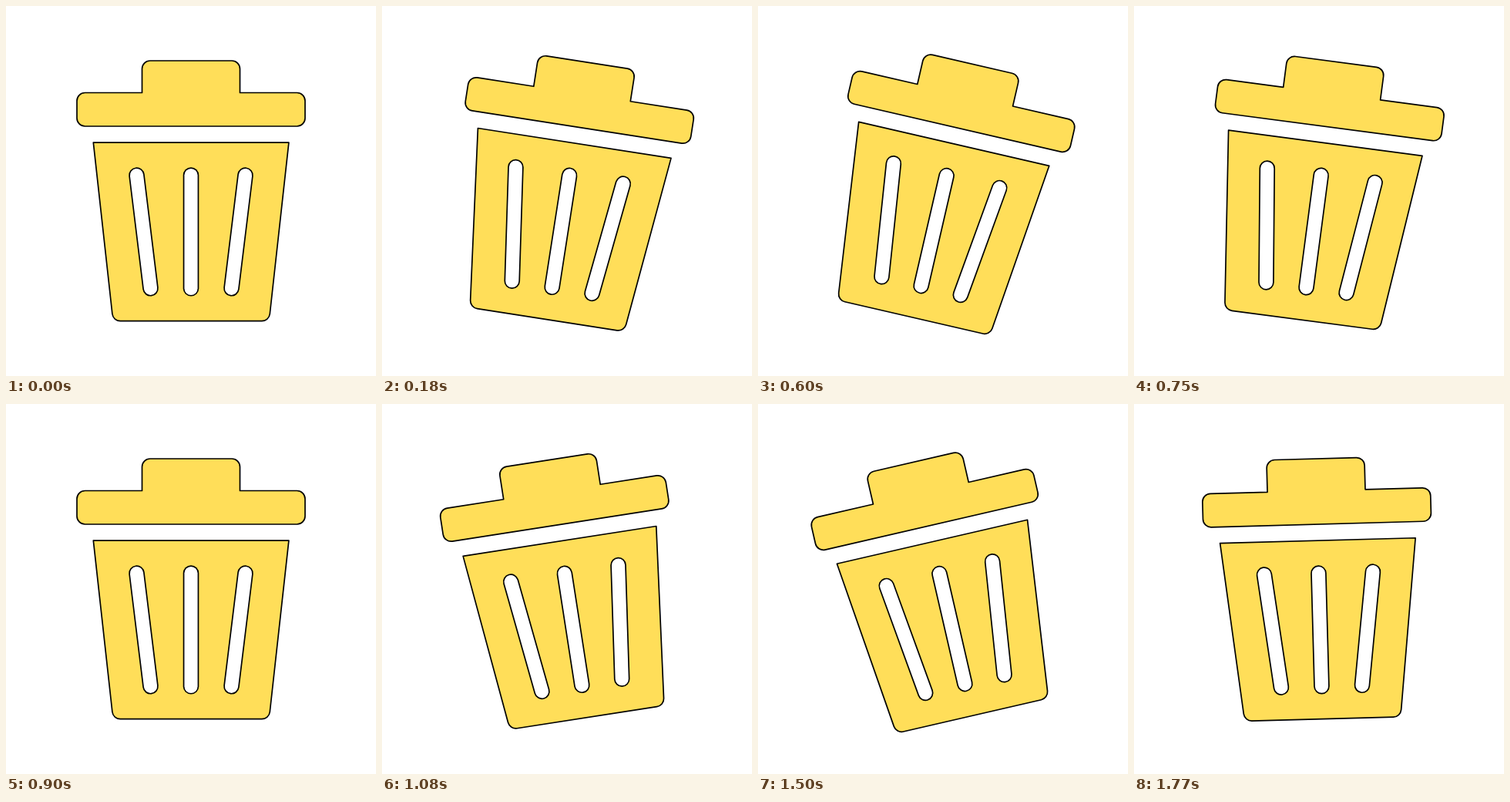
Recreate the animation shown at these times as an HTML page. Size 480 by 480 pixels, loop 1800 ms.

```html
<!DOCTYPE html>
<html lang="en">
<head>
<meta charset="utf-8">
<title>Swinging bin</title>
<style>
  html, body { margin: 0; width: 100%; height: 100%; overflow: hidden; background: #fff; }
  svg { display: block; width: 100%; height: 100%; }
  .shell { fill: #ffde59; stroke: #000; stroke-width: 1.7; stroke-linejoin: round; }
  .slot { stroke-linecap: round; }
  .rim { stroke: #000; stroke-width: 20.6; }
  .hole { stroke: #fff; stroke-width: 17.2; }
</style>
</head>
<body>
<svg viewBox="0 0 480 480">
  <g id="bin">
    <path class="shell" d="M176.5 112.5V81.5a10.5 10.5 0 0 1 10.5-10.5H293a10.5 10.5 0 0 1 10.5 10.5V112.5
      H377.5a10.5 10.5 0 0 1 10.5 10.5V145.5a10.5 10.5 0 0 1-10.5 10.5H102.5a10.5 10.5 0 0 1-10.5-10.5V123
      a10.5 10.5 0 0 1 10.5-10.5Z"/>
    <path class="shell" d="M113.3 177.2H366.9L342.3 399.5a10.5 10.5 0 0 1-10.4 9.2H148.3a10.5 10.5 0 0 1-10.4-9.2Z"/>
    <g class="slot" id="slots"></g>
  </g>
</svg>
<script>
const LOOP = 1800, STEP = 30, SWING = 15;
const bin = document.getElementById('bin');

// Each slot leans outwards at the top, mirrored around the middle.
const slot = side => ['rim', 'hole'].map(kind =>
  `<line class="${kind}" x1="${240 + side * 70.5}" y1="219.6" x2="${240 + side * 52.5}" y2="366.3"/>`).join('');
document.getElementById('slots').innerHTML = [-1, 0, 1].map(slot).join('');

function render(ms) {
  const t = Math.floor((ms % LOOP) / STEP) * STEP;
  const angle = SWING * Math.sin(2 * Math.PI * t / LOOP);
  bin.setAttribute('transform', `rotate(${angle} 240 240)`);
}

function tick() {
  render(performance.now());
  requestAnimationFrame(tick);
}
tick();
</script>
</body>
</html>
```
